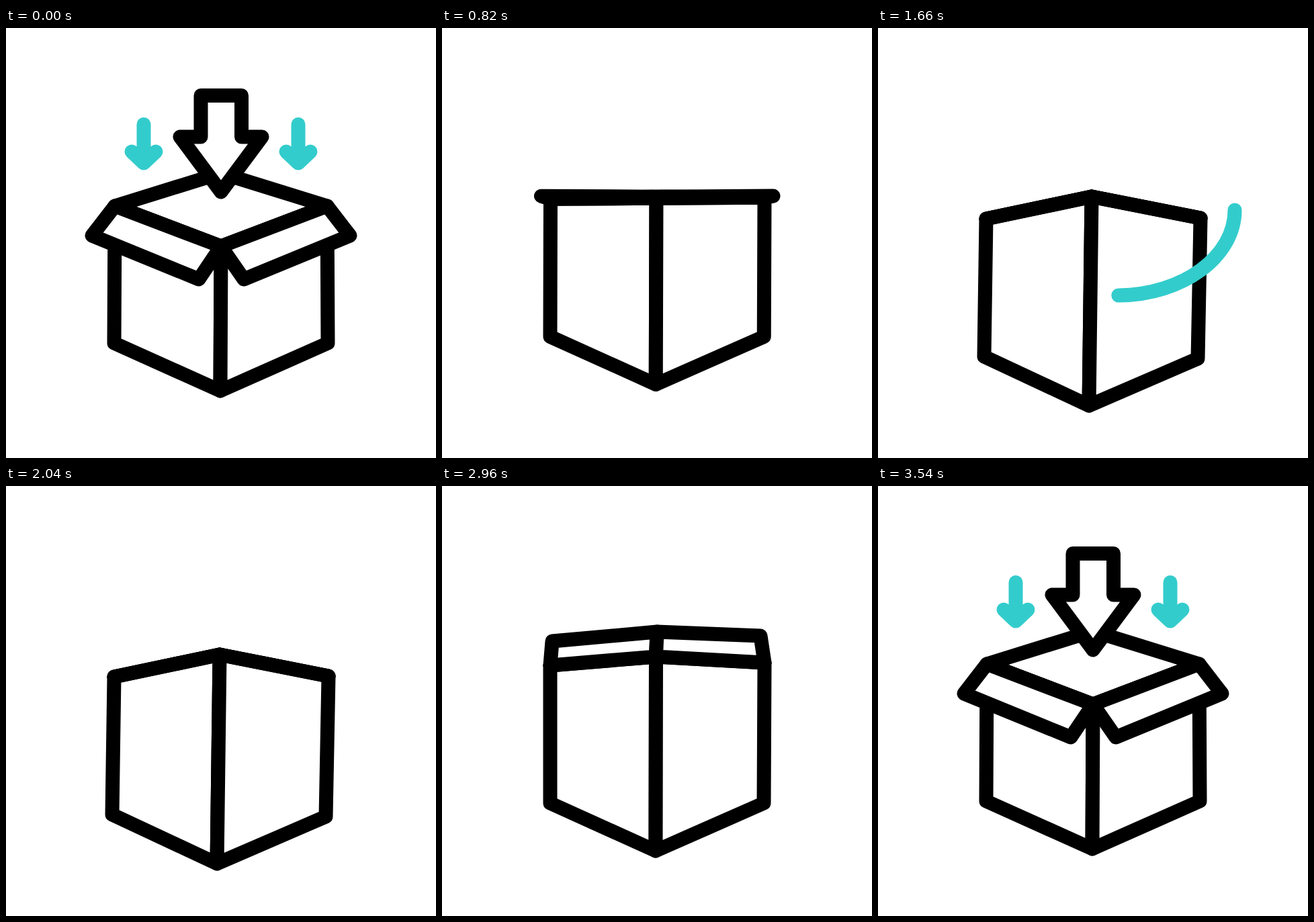
These frames come from a looping animation (640 by 640 pixels, 3600 ms). An HTML page:

```html
<!DOCTYPE html>
<html lang="en">
<head>
<meta charset="utf-8">
<title>Box packing</title>
<style>
  html, body { margin: 0; width: 100%; height: 100%; overflow: hidden; background: #fff; }
  svg { display: block; width: 100vw; height: 100vh; }
  .ink { fill: #fff; stroke: #000; }
  .accent { fill: none; stroke: #33cccc; }
  path { stroke-width: 21; stroke-linecap: round; stroke-linejoin: round; }
</style>
</head>
<body>
<svg viewBox="0 0 640 640">
  <path id="top" class="ink"/>
  <g id="small">
    <path class="accent" d="M205 143.500V200M187 184L205 201L223 184"/>
    <path class="accent" d="M435 143.500V200M417 184L435 201L453 184"/>
  </g>
  <path id="arrow" class="ink" d="M290 100.500H350.500V162H381L320 244L259 162H290Z"/>
  <path id="faceL" class="ink"/>
  <path id="faceR" class="ink"/>
  <path id="flapL" class="ink"/>
  <path id="flapR" class="ink"/>
  <path id="loop" class="accent" d="M47 378A146.500 137 0 0 0 340 378"/>
  <path id="swirl" class="accent"/>
  <path id="dashL" class="accent" d="M135 424L281 485"/>
  <path id="dashR" class="accent" d="M349 488L446 458"/>
</svg>
<script>
const LOOP = 3600;
const $ = id => document.getElementById(id);

const ease = {
  line: u => u,
  in: u => u * u,
  out: u => u * (2 - u),
  both: u => u * u * (3 - 2 * u)
};

// Box corners: rim left, front, right, back; base left, front, right
const rims = {
  open:   [162,265, 320,325, 478,265, 320,216, 161,469, 319,540, 479,469],
  flat:   [162,241, 319.5,252.5, 480,241, 320,226, 161,446, 318.5,517, 479.5,446],
  raised: [161,267, 318.5,254, 480,263, 320,275, 161,472, 318,543, 479,472],
  tilted: [164,294, 319,252, 482,273, 325,315, 175,500, 335,561, 492,482],
  shut:   [161,284, 318,251, 480,283, 318,316, 158,489, 314,562, 476,492]
};
// Flap tips: left outer, left inner, right outer, right inner
const tips = {
  open:   [128,309, 287,374, 512,309, 354,374],
  wide:   [122,312, 285,379, 516,312, 356,379],
  flat:   [128,286, 309,304, 514,288, 331,304],
  raised: [164,231, 320,217, 474,223, 320,217],
  high:   [166,216, 320,201, 473,214, 320,201],
  tilted: rims.tilted.slice(0, 2).concat(rims.tilted.slice(2, 6), rims.tilted.slice(2, 4)),
  shut:   rims.shut.slice(0, 2).concat(rims.shut.slice(2, 6), rims.shut.slice(2, 4))
};
const pose = (rim, tip = rim) => [...rims[rim], ...tips[tip]];

// Each key: time, value, easing on the way in
const boxKeys = [
  [220, pose("open")],
  [520, pose("flat"), "both"],
  [760, pose("flat")],
  [880, pose("raised", "high"), "both"],
  [1000, pose("shut"), "both"],
  [1160, pose("tilted"), "both"],
  [1380, pose("shut"), "both"],
  [2740, pose("shut")],
  [2960, pose("raised"), "both"],
  [3140, pose("flat"), "in"],
  [3340, pose("open", "wide"), "out"],
  [3520, pose("open"), "both"]
];
const arrowKeys = [[220, 0], [520, -42, "in"], [590, -61, "out"], [740, 230, "in"],
  [3180, 230], [3440, 36, "line"], [3530, 0, "out"]];
const smallKeys = [[220, 0], [520, -34, "in"], [590, -49, "out"], [740, 230, "in"],
  [3160, 230], [3400, -8, "out"], [3530, 0, "both"]];

function at(keys, t) {
  if (t <= keys[0][0]) return keys[0][1];
  const i = keys.findIndex(k => k[0] > t);
  if (i < 0) return keys[keys.length - 1][1];
  const [t0, a] = keys[i - 1], [t1, b, e = "line"] = keys[i];
  const u = ease[e]((t - t0) / (t1 - t0));
  return Array.isArray(a) ? a.map((v, j) => v + (b[j] - v) * u) : a + (b - a) * u;
}

// Swirl path, and how far along it the front pass begins
const swirl = $("swirl");
const back = "M317 236L317 223C316 202 306 197 285 197C200 197 137 230 137 285C137 355 245 398 356 398";
swirl.setAttribute("d", back);
const backLength = swirl.getTotalLength();
swirl.setAttribute("d", back + "C453 398 531 341 531 271");
const front = backLength / swirl.getTotalLength();
const seed = 13 / swirl.getTotalLength();

const strokes = [
  { el: $("loop"),
    tail: [[900, 0], [1160, 0.376, "in"], [1280, 1, "line"]],
    head: [[840, 0], [1160, 0.624, "both"], [1270, 1, "out"]] },
  { el: swirl,
    tail: [[1300, 0], [1660, front, "both"], [1820, 1, "line"]],
    head: [[1120, 0], [1160, seed, "line"], [1660, 1, "both"]] },
  { el: $("dashL"),
    tail: [[2220, 0], [2410, 0.363, "both"], [2640, 1, "both"]],
    head: [[2120, 0], [2380, 1, "both"]] },
  { el: $("dashR"),
    tail: [[2420, 0], [2700, 1, "both"]],
    head: [[2200, 0], [2400, 1, "both"]] }
].map(s => ({ ...s, size: s.el.getTotalLength() }));

function trim({ el, tail, head, size }, t) {
  const a = at(tail, t) * size, b = at(head, t) * size;
  el.style.display = b - a > 0.1 ? "" : "none";
  el.style.strokeDasharray = `${Math.max(b - a, 0.1)} ${size * 2}`;
  el.style.strokeDashoffset = -a;
}

function shape(id, box, ...corners) {
  const pts = corners.map(i => box[2 * i].toFixed(2) + " " + box[2 * i + 1].toFixed(2));
  $(id).setAttribute("d", "M" + pts.join("L") + "Z");
}

function shift(id, y, show) {
  $(id).setAttribute("transform", `translate(0 ${y})`);
  $(id).style.display = show ? "" : "none";
}

function draw(t) {
  const box = at(boxKeys, t);
  shape("top", box, 0, 1, 2, 3);
  shape("faceL", box, 0, 4, 5, 1);
  shape("faceR", box, 1, 5, 6, 2);
  shape("flapL", box, 0, 7, 8, 1);
  shape("flapR", box, 2, 9, 10, 1);
  const show = t < 740 || t > 3150;
  shift("arrow", at(arrowKeys, t), show);
  shift("small", at(smallKeys, t), show);
  strokes.forEach(s => trim(s, t));
}

const start = performance.now();
function tick() {
  draw((performance.now() - start) % LOOP);
  requestAnimationFrame(tick);
}
tick();
</script>
</body>
</html>
```
